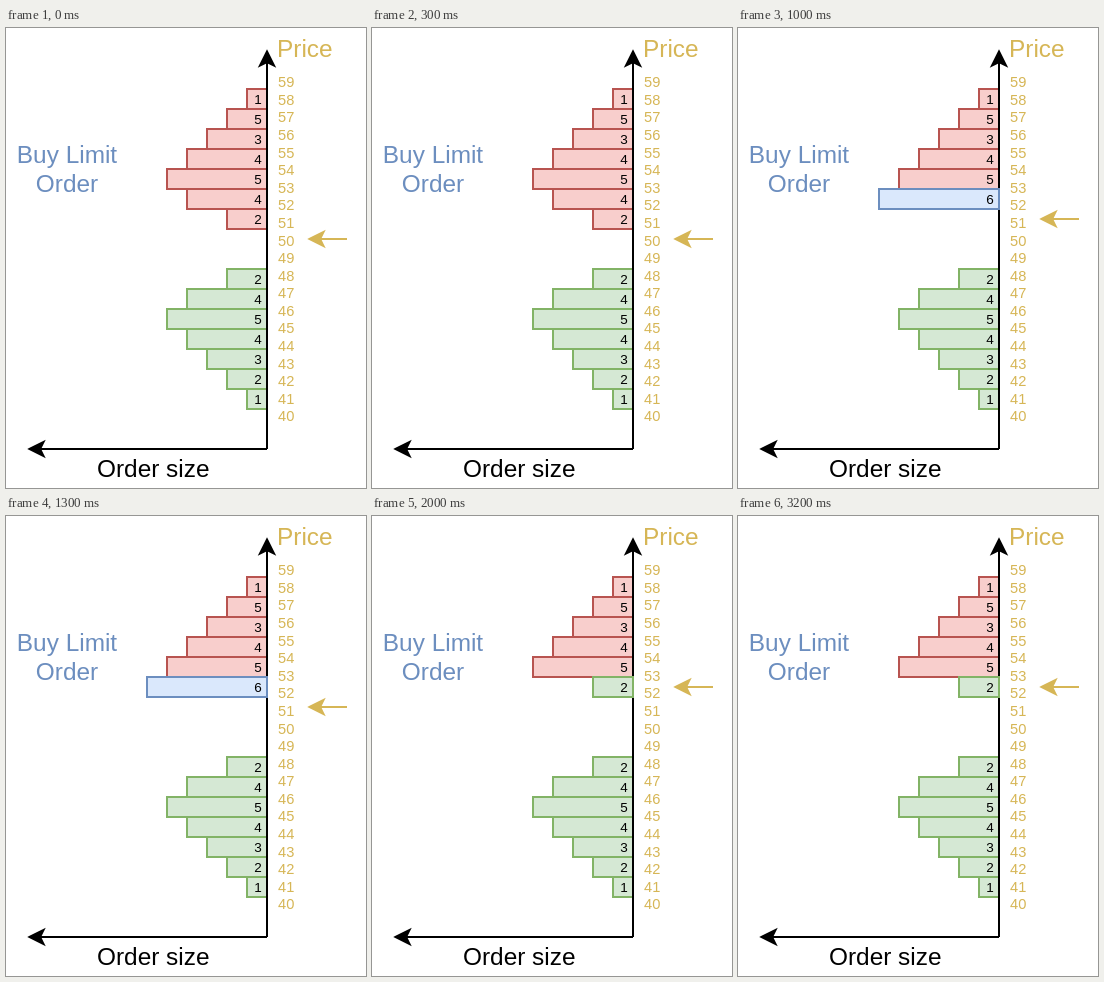
These frames come from a looping animation (360 by 460 pixels, 4 s). An HTML page:

```html
<!DOCTYPE html>
<html lang="en">
<head>
<meta charset="utf-8">
<title>Buy limit order</title>
<style>
  html, body { margin: 0; width: 100%; height: 100%; overflow: hidden; background: #fff; }
  svg { display: block; width: 360px; height: 460px; font-family: "Liberation Sans", Arial, sans-serif; }
  .bar rect { stroke-width: 2; }
  .bar text { font-size: 13.5px; text-anchor: middle; fill: #000; }
  .red rect { fill: #f8cecc; stroke: #b85450; }
  .green rect { fill: #d5e8d4; stroke: #82b366; }
  .blue rect { fill: #dae8fc; stroke: #6c8ebf; }
  .axis { stroke: #000; stroke-width: 2; fill: #000; }
  .title { font-size: 24.4px; }
  .order { fill: #6c8ebf; text-anchor: middle; }
  .price { fill: #d6b656; }
  #prices { font-size: 14.65px; }
  #pointer { stroke: #d6b656; stroke-width: 2; fill: #d6b656; animation: climb 4s step-end infinite; }

  .resting, .taken, .full, .partial, .rest, .booked { animation: 4s step-end infinite; }
  .resting { animation-name: resting; }
  .taken { animation-name: taken; }
  .full { animation-name: full; }
  .partial { animation-name: partial; }
  .rest { animation-name: rest; }
  .booked { animation-name: booked; }

  @keyframes resting { 0% { visibility: visible } 12.5%, 100% { visibility: hidden } }
  @keyframes taken { 0% { visibility: visible } 25%, 100% { visibility: hidden } }
  @keyframes full { 0% { visibility: hidden } 12.5% { visibility: visible } 25%, 100% { visibility: hidden } }
  @keyframes partial { 0% { visibility: hidden } 25% { visibility: visible } 37.5%, 100% { visibility: hidden } }
  @keyframes rest { 0% { visibility: hidden } 37.5% { visibility: visible } 50%, 100% { visibility: hidden } }
  @keyframes booked { 0% { visibility: hidden } 50%, 100% { visibility: visible } }
  @keyframes climb {
    0% { transform: translateY(0) }
    25% { transform: translateY(-20px) }
    37.5%, 100% { transform: translateY(-40px) }
  }
</style>
</head>
<body>
<svg viewBox="0 0 360 460">
  <g id="book"></g>
  <g class="axis">
    <path d="M261 421V33M261 421H33" fill="none"/>
    <path d="M261 23.5L268 37.5L261 34L254 37.5Z"/>
    <path d="M23.5 421L37.5 414L34 421L37.5 428Z"/>
  </g>
  <g id="incoming"></g>
  <g class="title">
    <text class="price" x="271" y="29">Price</text>
    <text class="order" x="61" y="135">Buy Limit</text>
    <text class="order" x="61" y="164">Order</text>
    <text x="91" y="449">Order size</text>
  </g>
  <g id="prices" class="price"></g>
  <g id="pointer">
    <path d="M341 211H313" fill="none"/>
    <path d="M303.5 211L317.5 204L314 211L317.5 218Z"/>
  </g>
</svg>
<script>
  const NS = "http://www.w3.org/2000/svg";
  const ROW = 20, RIGHT = 261, TOP = 61;
  const book = document.getElementById("book");
  const incoming = document.getElementById("incoming");
  const prices = document.getElementById("prices");

  function add(parent, tag, attrs, text) {
    const node = document.createElementNS(NS, tag);
    for (const key in attrs) node.setAttribute(key, attrs[key]);
    if (text !== undefined) node.textContent = text;
    return parent.appendChild(node);
  }

  function bar(parent, row, length, size, look) {
    const y = TOP + row * ROW, width = length * ROW;
    const g = add(parent, "g", { class: "bar " + look });
    add(g, "rect", { x: RIGHT - width, y, width, height: ROW });
    add(g, "text", { x: 252, y: y + 15 }, size);
  }

  // [length, size] per price level, top to bottom
  const asks = [[1, 1], [2, 5], [3, 3], [4, 4], [5, 5], [4, 4, "resting"], [2, 2, "taken"]];
  const bids = [[2, 2], [4, 4], [5, 5], [4, 4], [3, 3], [2, 2], [1, 1]];
  asks.forEach(([len, size, phase = ""], i) => bar(book, i, len, size, "red " + phase));
  bids.forEach(([len, size], i) => bar(book, i + 9, len, size, "green"));

  bar(incoming, 5, 8, 8, "blue full");
  bar(incoming, 5, 6, 6, "blue partial");
  bar(incoming, 5, 2, 2, "blue rest");
  bar(incoming, 5, 2, 2, "green booked");

  for (let i = 0; i < 20; i++) {
    add(prices, "text", { x: 272, y: 59.3 + i * 17.58 }, 59 - i);
  }
</script>
</body>
</html>
```
